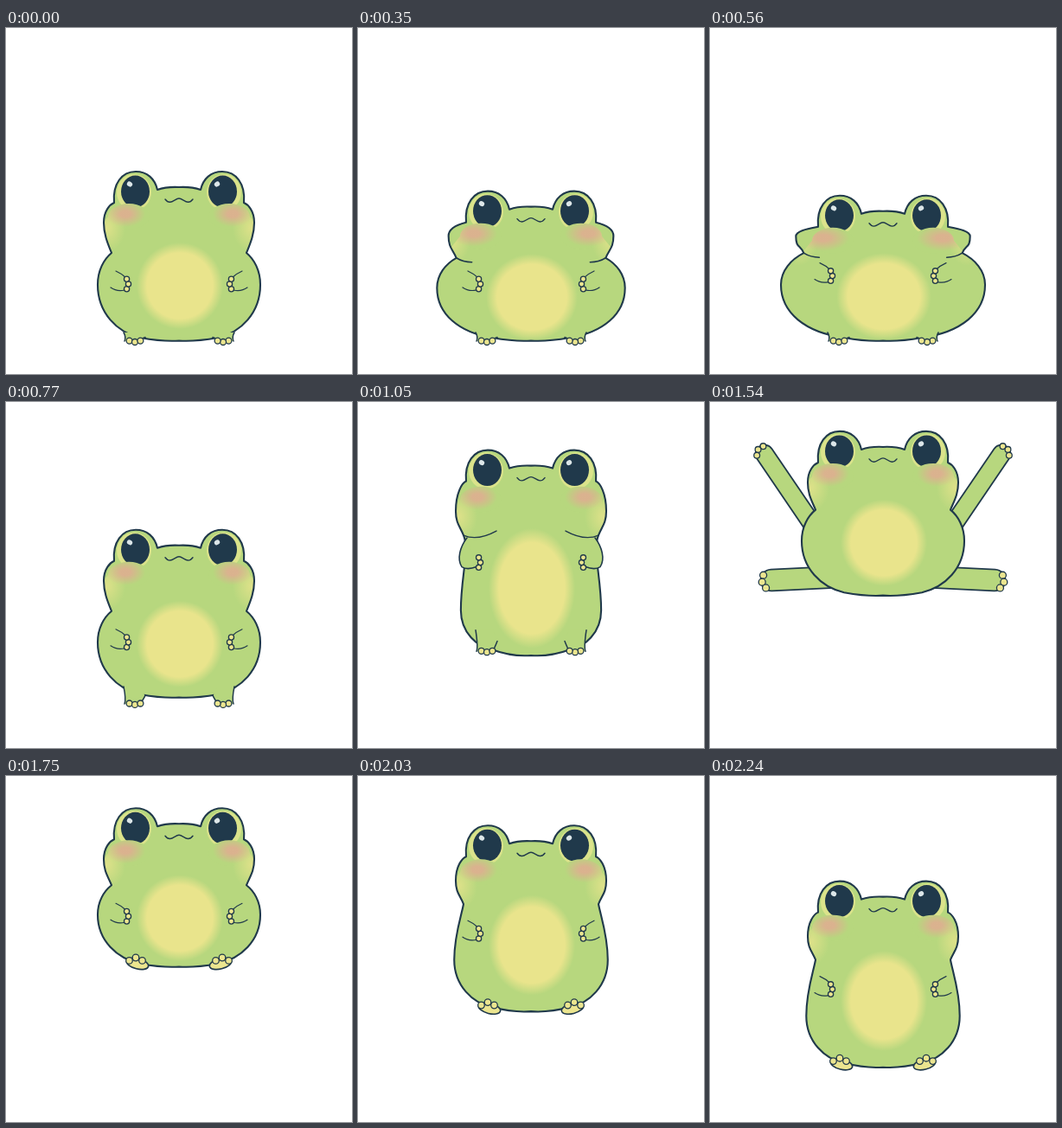
Animation, 400 px wide and 400 px high, one loop 2310 ms. Source, as an HTML page with a canvas:

```html
<!DOCTYPE html>
<html lang="en">
<head>
<meta charset="utf-8">
<title>Jumping frog</title>
<style>
  html, body { margin: 0; width: 100%; height: 100%; overflow: hidden; background: #fff; }
  canvas { display: block; width: 100%; height: 100%; }
</style>
</head>
<body>
<canvas id="stage" width="400" height="400"></canvas>
<script>
const ctx = document.getElementById('stage').getContext('2d');
const LOOP = 2310, TICK = 70, TAU = Math.PI * 2;
const INK = '#20394b', GREEN = '#b7d77e', LIGHT = '#dbe38b', YELLOW = '#ebe58f';

const lerp = (a, b, t) => a + (b - a) * t;
const ramp = (a, b, k) => Math.min(1, Math.max(0, (k - a) / (b - a)));
const smooth = u => u * u * (3 - 2 * u);

// Crouch, stretch upwards, hang with limbs spread, fall with feet tucked in
function poseAt(k) {
  const crouch = Math.sin(Math.PI / 2 * ramp(1, 8, k));
  const rise = smooth(ramp(7.5, 17.3, k));
  const lift = ramp(8, 19, k) ** 1.45;
  const sink = ramp(19, 33, k);
  const fall = 0.15 * sink ** 2 + 0.85 * sink ** 6.2;
  const drop = ramp(25, 33, k) ** 1.45;
  const tuck = smooth(ramp(19, 24, k));
  const air = ramp(8, 11, k);
  const spread = Math.sin(Math.PI * ramp(19, 25, k)) ** 2;

  const e = 166 + 29 * crouch - 162 * rise + 133 * fall;
  const b = 362 - 132 * lift - 9 * tuck + 141 * drop;
  const wide = 24 * crouch ** 2 * (1 - smooth(air));
  const thin = Math.max(0, b - e - 200) * 0.34;
  const ny = e + 94 - 1.15 * wide + 0.35 * thin - 5 * tuck;
  const tall = b - ny;
  return {
    e, b, wide, thin, ny, spread,
    w: 94 + wide - thin,
    c: 87 + wide * 0.57,
    cy: e + 59 - wide * 0.5 + thin * 0.9,
    nx: 78 + wide * 0.57,
    wy: ny + tall * Math.max(0.36, 0.36 + (tall - 102) * 0.007),
    hy: ny + 36 - wide * 0.4 - thin * 0.35,
    fy: b + 1 + 7 * air - 0.95 * thin,
    leg: 11 + 10 * air + 0.35 * thin,
    tucked: tuck > 0.5
  };
}

function mirror(draw) {
  for (const side of [-1, 1]) {
    ctx.save();
    ctx.translate(200, 0);
    ctx.scale(side, 1);
    draw(side);
    ctx.restore();
  }
}

function ink(width) {
  ctx.lineWidth = width;
  ctx.strokeStyle = INK;
  ctx.stroke();
}

function ellipse(x, y, rx, ry, fill, line, turn = 0) {
  ctx.beginPath();
  ctx.ellipse(x, y, rx, ry, turn, 0, TAU);
  ctx.fillStyle = fill;
  ctx.fill();
  if (line) ink(line);
}

function curve(x0, y0, cx, cy, x1, y1, width = 1.2) {
  ctx.beginPath();
  ctx.moveTo(x0, y0);
  ctx.quadraticCurveTo(cx, cy, x1, y1);
  ink(width);
}

function glow(x, y, rx, ry, rgb, alpha, core = 0) {
  ctx.save();
  ctx.translate(x, y);
  ctx.scale(rx, ry);
  const g = ctx.createRadialGradient(0, 0, 0, 0, 0, 1);
  g.addColorStop(core, `rgba(${rgb},${alpha})`);
  g.addColorStop(1, `rgba(${rgb},0)`);
  ctx.fillStyle = g;
  ctx.fillRect(-1, -1, 2, 2);
  ctx.restore();
}

function limb(x0, y0, x1, y1, width) {
  for (const [color, extra] of [[INK, 3.6], [GREEN, 0]]) {
    ctx.beginPath();
    ctx.moveTo(x0, y0);
    ctx.lineTo(x1, y1);
    ctx.lineWidth = width + extra;
    ctx.strokeStyle = color;
    ctx.stroke();
  }
}

// Three toes on an arc around a palm
function toes(x, y, r, turn, reach, gap) {
  for (let i = -1; i <= 1; i++) {
    const a = turn + i * gap;
    ellipse(x + reach * Math.cos(a), y + reach * Math.sin(a), r, r, YELLOW, 1.3);
  }
}

// One half of the outline, from the crown to the bottom
function halfBody({ e, c, cy, nx, ny, w, wy, b, thin }) {
  const path = new Path2D(), hip = b - 4 - thin * 0.25;
  path.moveTo(0, e + 18);
  path.bezierCurveTo(10, e + 17.5, 18, e + 18.5, 25, e + 21);
  path.bezierCurveTo(28, e + 8, 37, e, 50, e);
  path.bezierCurveTo(66, e, 77, e + 14, 75, e + 36);
  path.bezierCurveTo(lerp(75, c, 0.4), e + 38, c, lerp(e + 36, cy, 0.4), c, cy);
  path.bezierCurveTo(c, cy + 14, nx + 4, ny - 10, nx, ny);
  path.bezierCurveTo(lerp(nx, w, 0.55) - thin * 0.7, lerp(ny, wy, 0.2), w, lerp(wy, ny, 0.45), w, wy);
  path.bezierCurveTo(w, lerp(wy, b, 0.5), 0.76 * w, b - 10, 45, hip);
  path.bezierCurveTo(28, b - 1, 12, b + 0.5, 0, b - 0.5);
  return path;
}

function standingFoot({ fy, leg }) {
  const top = fy - leg;
  ctx.beginPath();
  ctx.moveTo(64, top);
  ctx.quadraticCurveTo(61, fy - 6, 63, fy - 1);
  ctx.lineTo(44, fy - 1);
  ctx.lineTo(39, Math.min(top + 12, fy - 6));
  ctx.lineTo(44, top);
  ctx.fillStyle = GREEN;
  ctx.fill();
  curve(64, top, 61, fy - 6, 63, fy - 1, 1.5);
  curve(39, fy - leg / 2, 42, fy - 5, 44, fy - 2, 1.5);
  toes(51, fy - 15, 3.5, Math.PI / 2, 15, 0.44);
}

function tuckedFoot(y) {
  ellipse(48, y + 2, 13, 6, YELLOW, 1.6, -0.25);
  toes(50, y + 5, 3.8, -Math.PI / 2, 10, 0.85);
}

function arm({ hy, ny, thin }) {
  if (thin > 8) {
    ctx.beginPath();
    ctx.moveTo(74, ny + 3);
    ctx.bezierCurveTo(82, hy - 18, 86, hy - 4, 80, hy + 5);
    ctx.quadraticCurveTo(74, hy + 9, 63, hy + 5);
    ctx.fillStyle = GREEN;
    ctx.fill();
    ink(1.6);
  } else {
    curve(73, hy - 15, 66, hy - 12, 61, hy - 7);
    curve(79, hy + 4, 72, hy + 9, 63, hy + 7);
  }
  toes(68, hy, 3.1, Math.PI, 9.5, 0.65);
}

function face({ e, c, cy, wide, thin }) {
  const lid = e + 52 + thin * 0.4;
  mirror(side => {
    ellipse(52, e + 24, 20, 21, LIGHT);
    ellipse(50.5, e + 23, 16.5, 18.5, INK);
    ellipse(50.5 - side * 6.5, e + 14.5, 3.3, 2.8, '#dce6e8', 0, -0.6);
    ellipse(58, lid, 24, 15, GREEN);
    ctx.save();
    ctx.beginPath();
    ctx.ellipse(58, lid, 24, 15, 0, Math.PI, TAU);
    ctx.lineTo(130, lid + 60);
    ctx.lineTo(20, lid + 60);
    ctx.clip();
    glow(c - 3, cy + 6, 22, 28, '232,228,140', 0.8);
    glow(62 + wide * 0.3, lid - 3, 23 + wide * 0.3, 15, '230,166,148', 0.75, 0.25);
    ctx.restore();
  });
  ctx.beginPath();
  ctx.moveTo(184, e + 32);
  ctx.bezierCurveTo(190, e + 40, 195, e + 31, 200, e + 31);
  ctx.bezierCurveTo(205, e + 31, 210, e + 40, 216, e + 32);
  ink(1.4);
}

function draw(p) {
  const { nx, ny, hy, b, wide, thin, spread } = p;
  const half = halfBody(p), whole = new Path2D(), out = spread > 0.05;
  const hand = [lerp(62, 137, spread), lerp(hy, 60, spread)];
  const foot = [lerp(53, 129, spread), lerp(p.fy, 206, spread)];

  ctx.fillStyle = '#fff';
  ctx.fillRect(0, 0, 400, 400);
  if (out) mirror(() => {
    limb(74, hy - 8, ...hand, 19);
    limb(52, b - 22, ...foot, 23);
  });

  for (const side of [-1, 1]) whole.addPath(half, new DOMMatrix([side, 0, 0, 1, 200, 0]));
  ctx.save();
  ctx.clip(whole);
  ctx.fillStyle = GREEN;
  ctx.fillRect(0, 0, 400, 400);
  glow(201, ny + 38 + wide * 0.5 + thin * 1.8, 50 + wide * 0.2, 50 + thin * 1.5, '233,228,140', 1, 0.76);
  face(p);
  ctx.restore();

  ctx.lineWidth = 2.1;
  ctx.strokeStyle = INK;
  ctx.stroke(whole);

  mirror(() => {
    if (wide > 4) curve(nx, ny, nx - 8, ny + 5, nx - 18, ny + 5, 1.6);
    if (thin > 8) curve(nx, ny, 62, ny + 7, 40, ny - 5, 1.4);
    if (out) {
      toes(...hand, 3.4, -0.6, 9, 0.8);
      toes(...foot, 4, 0.2, 11, 0.75);
    } else {
      arm(p);
      if (p.tucked) tuckedFoot(b - 6);
      else standingFoot(p);
    }
  });
}

ctx.lineCap = ctx.lineJoin = 'round';
const start = performance.now();

function loop() {
  const tick = Math.floor((performance.now() - start) % LOOP / TICK);
  // The crouch pauses for one extra tick before the jump
  draw(poseAt(tick === 7 ? 6 : tick));
  requestAnimationFrame(loop);
}
loop();
</script>
</body>
</html>
```
